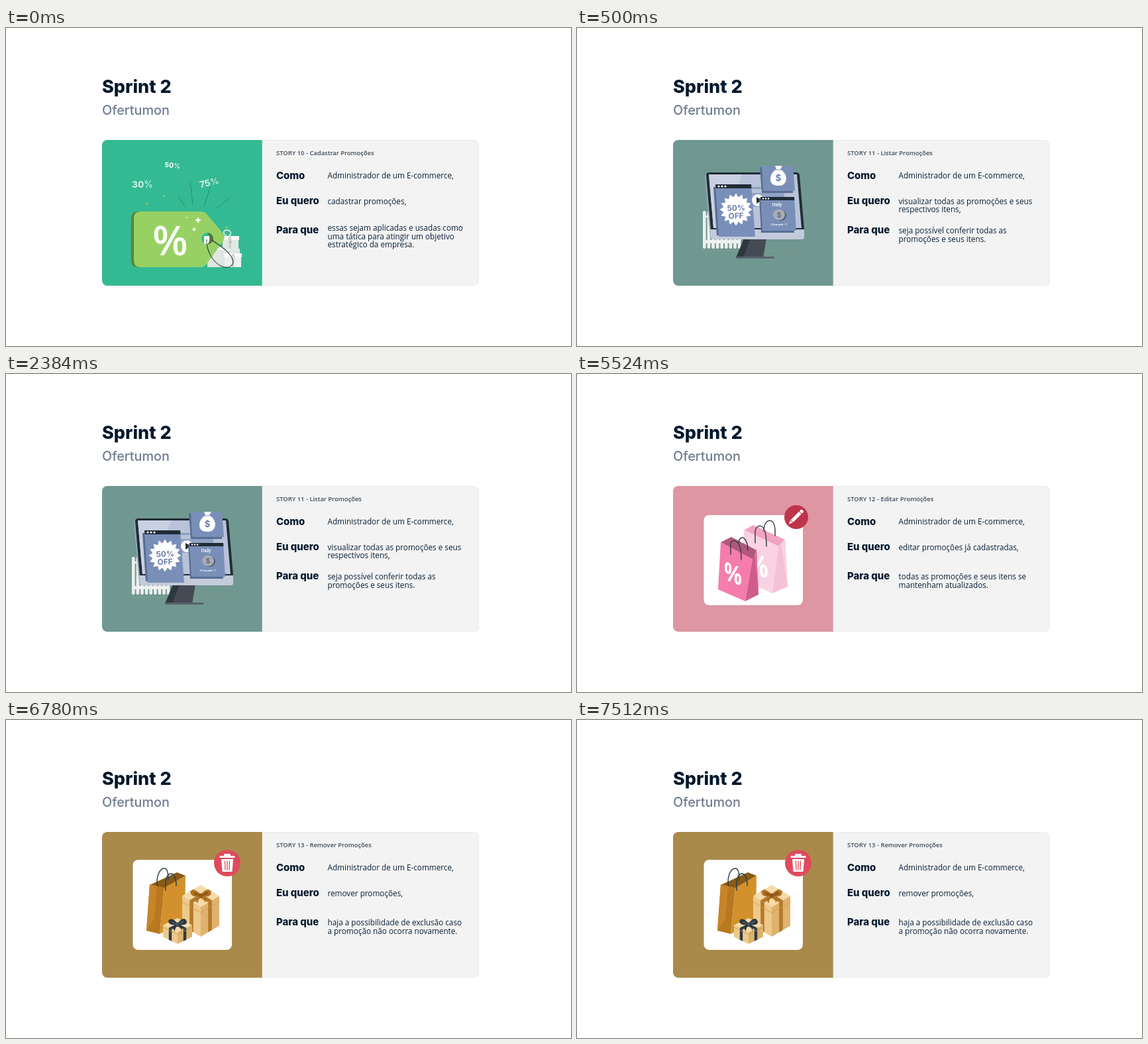
An HTML page for the animation above (8 s loop, 853 px wide and 480 px high).

```html
<!DOCTYPE html>
<html lang="pt">
<head>
<meta charset="utf-8">
<title>Sprint 2</title>
<style>
  html, body { margin: 0; width: 100%; height: 100%; overflow: hidden; background: #fff; }
  svg { display: block; width: 853px; height: 480px; }
  text { font-family: "Open Sans", "Noto Sans", sans-serif; fill: #0b2036; }
  .head { font-family: Inter, sans-serif; font-weight: 700; }
  .heavy { font-weight: 800; fill: #04192d; }
  .brand { font-family: Inter, sans-serif; font-weight: 500; fill: #717b91; }
  .body { font-size: 11.73px; }
  .story { font-size: 9.42px; font-weight: 600; fill: #3f4a57; }
  .ad { font-family: "Noto Serif", serif; font-weight: 700; }
  .white { fill: #fff; }
  .mid { text-anchor: middle; }
  .line { fill: none; stroke-linecap: round; stroke-linejoin: round; }
</style>
</head>
<body>
<svg viewBox="0 0 853 480">
  <defs><clipPath id="card"><rect x="145" y="169" width="569" height="220" rx="8"/></clipPath></defs>
  <text class="head heavy" x="145" y="98.4" font-size="27">Sprint 2</text>
  <text class="brand" x="145" y="131" font-size="19.8">Ofertumon</text>
  <rect x="145" y="169" width="569" height="220" rx="8" fill="#f3f3f3"/>
  <rect x="145.5" y="169.5" width="568" height="219" rx="8" fill="none" stroke="#ebebeb"/>
  <g font-size="14.9">
    <text class="head heavy" x="408" y="228">Como</text>
    <text class="head heavy" x="408" y="265.6">Eu quero</text>
    <text class="head heavy" x="408" y="310.4">Para que</text>
  </g>
  <text class="body" x="485.5" y="227">Administrador de um E-commerce,</text>
  <g id="slides"></g>
</svg>
<script>
const poly = (points, fill, extra = '') => `<polygon points="${points}" fill="${fill}" ${extra}/>`;
const path = (d, fill, extra = '') => `<path d="${d}" fill="${fill}" ${extra}/>`;
const line = (d, stroke, width = 1) => `<path class="line" d="${d}" stroke="${stroke}" stroke-width="${width}"/>`;
const rect = (x, y, w, h, fill, r = 0) => `<rect x="${x}" y="${y}" width="${w}" height="${h}" rx="${r}" fill="${fill}"/>`;
const dot = (x, y, r, fill) => `<circle cx="${x}" cy="${y}" r="${r}" fill="${fill}"/>`;
const range = (n, fn) => Array.from({ length: n }, (_, i) => fn(i)).join('');

const sparkle = (x, y, r) =>
  path(`M${x} ${y - r}Q${x} ${y} ${x + r} ${y}Q${x} ${y} ${x} ${y + r}Q${x} ${y} ${x - r} ${y}Q${x} ${y} ${x} ${y - r}`,
    '#fff', 'stroke="#fff" stroke-width="1"');

const discount = (n, x, y, size, angle, fill) =>
  `<text class="head mid" style="fill:${fill}" font-size="${size}" transform="translate(${x} ${y}) rotate(${angle})">${n}<tspan font-weight="400">%</tspan></text>`;

function burst(x, y, outer, inner, spikes) {
  const points = Array.from({ length: spikes * 2 }, (_, i) => {
    const a = i * Math.PI / spikes, r = i % 2 ? inner : outer;
    return `${(x + r * Math.sin(a)).toFixed(1)},${(y - r * Math.cos(a)).toFixed(1)}`;
  });
  return poly(points.join(' '), '#fff');
}

const skewedPercent = (x, y, size) =>
  `<text class="white mid" font-weight="700" font-size="${size}" transform="matrix(.8 .3 -.04 1 ${x} ${y})">%</text>`;

function priceTag() {
  return rect(304, 333, 49, 28, '#dfe5e1') + rect(302, 330, 37, 5, '#f4f6f4') +
    rect(327, 318, 24, 16, '#e3e8e5') + rect(325, 314, 27, 6, '#f6f7f6') +
    rect(330, 343, 25, 18, '#eef0ee') + rect(329, 340, 27, 6, '#f8f9f8') +
    rect(299, 314, 13, 17, '#f0f3f0') + rect(336, 315, 4, 18, '#c9d6cf') + rect(341, 341, 4, 20, '#d1dad4') +
    line('M333 314C325 309 330 305 333 305C338 305 343 310 336 314', '#eef2ef', 1.5) +
    dot(339, 323, 1.2, '#67b96b') +
    path('M199 277H208V361H199Q189 361 189 350V288Q189 277 199 277Z', '#5c8339') +
    path('M203 277H295Q299 277 302 280L327 309Q332 316 327 323L303 356Q299 361 294 361H203Q193 361 193 351V287Q193 277 203 277ZM304 309A9 9 0 1 0 304 327A9 9 0 1 0 304 309Z', '#97d163', 'fill-rule="evenodd"') +
    path('M304 309A9 9 0 0 1 304 327Q311 318 304 309', '#55753a') +
    line('M303 320C302 332 310 352 324 359C336 365 346 358 342 349C337 336 321 328 311 320', '#263c36', 1.1) +
    line('M303 325Q302 321 306 320', '#eff4ef', 1) +
    '<text class="white mid" x="248" y="343" font-size="62" font-weight="600">%</text>' +
    sparkle(290, 290, 4) + sparkle(284, 304, 2.5) + dot(273, 286, 1, '#fff') +
    line('M260 255L271 270M278 233L282 266M308 240L299 270M338 256L318 272', '#258a6b', .9) +
    [[213, 265], [238, 254], [333, 301]].map(([x, y]) => dot(x, y, 1.3, '#b7cf57')).join('') +
    [[257, 267], [262, 235], [347, 307]].map(([x, y]) => dot(x, y, .8, '#7fc87a')).join('') +
    discount(30, 206, 241, 13.8, 0, '#d9f1e7') +
    discount(50, 251, 211, 10.4, 6, '#fff') +
    discount(75, 308, 238, 13.6, -14, '#d9f1e7');
}

function monitor() {
  const dark = '#202c36', panel = '#7a8fb8', shadow = '#586d92', radiator = '#edf0ee';
  return line('M190 337H343', '#8c9a7d', .8) +
    range(9, i => {
      const top = i < 2 ? 276 : 312;
      return rect(190 + i * 6.6, top, 4.6, 333 - top, radiator, 2);
    }) +
    rect(190, 283, 12, 3, radiator) + rect(190, 320, 57, 5, radiator) +
    poly('252,318 286,318 281,347 240,347', '#454b55') + poly('252,318 262,318 251,347 240,347', '#2f3740') +
    rect(241, 345, 57, 3, '#59626c', 1) +
    path('M197 218L193 223L201 315Q202 319 206 319L210 304Z', '#94a4bd') +
    path('M201 304H343V316Q343 319 339 319H206Q202 319 202 315Z', '#c3cbdb') +
    path('M200 218H331Q335 218 336 222L343 304H202L195 222Q195 218 200 218Z', dark) +
    poly('199,221 332,221 339,302 206,302', '#b8c2d9') + poly('199,221 250,221 214,302 206,302', '#c8d0e1') +
    rect(262, 240, 47, 3, '#8f9fbd') + rect(262, 249, 51, 21, '#91a2c4') +
    poly('206,240 261,240 267,313 211,313', shadow) +
    poly('209,237 263,237 269,315 214,315', panel) + poly('209,236 263,236 263.5,242 209.5,242', dark) +
    range(3, i => dot(214 + i * 5, 239, 1.6, '#fff')) +
    burst(240, 274, 24.5, 19, 16) +
    ['50%', 'OFF'].map((word, i) =>
      `<text class="head mid" style="fill:#687da8" font-size="11.8" transform="translate(240.3 ${275.8 + i * 11.8}) rotate(-2)">${word}</text>`).join('') +
    poly('276,210 324,210 326,249 279,249', shadow) + poly('279,208 326,208 329,246 281,246', panel) +
    path('M299 208L310 208L307 213Q316 219 316 228Q315 238 304 238Q292 238 292 228Q292 219 301 213Z', '#fff') +
    line('M300 214H308', '#8396b8', 1) +
    '<text class="mid head" style="fill:#667da8" x="304" y="230.5" font-size="13">$</text>' +
    dot(273, 260, 9, '#fff') + poly('271,255 279,260 271,265', dark) +
    poly('275,257 326,257 328,309 278,309', shadow) +
    poly('277,255 328,255 331,306 280,306', panel) + poly('277,255 328,255 328.4,260 277.4,260', dark) +
    range(3, i => dot(281 + i * 4, 257.5, 1.2, '#fff')) +
    '<text class="white mid ad" x="302" y="269" font-size="6.3">Only</text>' +
    '<text class="white mid ad" x="305" y="298" font-size="4.1">15/month !!!</text>' +
    '<ellipse cx="307" cy="283" rx="9" ry="8" fill="#535e70"/><ellipse cx="305" cy="282" rx="9" ry="8" fill="#a7adb7"/>' +
    '<text class="mid head" style="fill:#626c7d" x="305" y="286" font-size="10">$</text>';
}

function pinkBags() {
  const handle = '#39414a';
  return rect(191.5, 213, 149.5, 136, '#fff', 8) +
    poly('252,236 266,228 314,250 304,260', '#f2a3c2') +
    poly('252,235 304,260 295,331 248,310', '#f9d3e4') + poly('304,260 314,249 318,321 295,331', '#f5c1d7') +
    poly('308,256 314,249 318,321', '#f9d1e2') +
    skewedPercent(273, 303, 43) +
    line('M269 255V239C269 231 275 227 280 231Q286 236 286 260M282 237C282 225 288 219 294 222Q300 226 299 244', handle, 1.5) +
    poly('217,254 233,246 271,266 265,280', '#b0587b') +
    poly('217,254 265,279 254,343 213,325', '#f57cab') + poly('265,279 271,266 274,333 254,343', '#cf5c8a') +
    poly('268,273 271,266 274,333', '#e06d9a') +
    skewedPercent(235, 315, 38) +
    line('M232 272V258C232 251 238 249 243 255Q248 261 248 280M244 257C244 247 250 244 254 250Q258 256 258 266', handle, 1.5) +
    dot(331, 216, 18, '#be354b') +
    '<g transform="translate(330.5 216) rotate(-45)">' +
    poly('-15,0 -9.5,-2.6 -9.5,2.6', '#fff') + rect(-8.5, -2.6, 17.5, 5.2, '#fff') + rect(10, -2.6, 4.5, 5.2, '#fff', 1.5) +
    '</g>';
}

// Isometric box: top corner, half width, half depth of the lid and side height.
function giftBox(x, y, w, d, h, ribbon) {
  const at = (u, v, drop = 0) => `${x + (u - v) * w},${y + (u + v) * d + drop}`;
  const quad = (corners, fill) => poly(corners.map(c => at(...c)).join(' '), fill);
  const a = .4, b = .6;
  return quad([[0, 1], [1, 1], [1, 1, h], [0, 1, h]], '#edc98b') +
    quad([[1, 1], [1, 0], [1, 0, h], [1, 1, h]], '#dfb36d') +
    quad([[0, 0], [1, 0], [1, 1], [0, 1]], '#f5dba9') +
    quad([[a, 1], [b, 1], [b, 1, h], [a, 1, h]], ribbon) +
    quad([[1, a], [1, b], [1, b, h], [1, a, h]], ribbon) +
    quad([[a, 0], [b, 0], [b, 1], [a, 1]], ribbon) +
    quad([[0, a], [1, a], [1, b], [0, b]], ribbon) +
    line(`M${at(0, 1, h * .2)}L${at(1, 1, h * .2)}L${at(1, 0, h * .2)}`, '#c99b57', .8);
}

const bow = (x, y, s, fill, shade) => `<g transform="translate(${x} ${y}) scale(${s})">` +
  path('M0 0C-7 -12 -17 -9 -15 -3Q-13 3 0 1C13 3 17 -1 15 -5C12 -12 5 -9 0 0Z', fill) +
  path('M-1 0L-11 8L-7 8L-5 12ZM1 0L10 6L7 7L7 11Z', fill) +
  path('M-2 0Q-7 -6 -11 -4Q-10 0 -2 0M2 0Q7 -7 11 -5Q11 0 2 0', shade) + dot(0, 0, 3, shade) + '</g>';

function gifts() {
  return rect(191.5, 211, 149.5, 136, '#fff', 8) +
    poly('217,249 258,230 271,235 239,254', '#8b5a17') +
    line('M229 252C226 239 231 224 239 224Q245 224 245 241', '#29414a', 1.5) +
    poly('217,248 239,253 232,323 212,318', '#b87820') + poly('217,248 228,251 224,300 212,318', '#c78528') +
    poly('239,253 271,235 270,304 232,323', '#d2912d') +
    line('M241 257C240 244 242 231 250 232Q257 234 257 250', '#29414a', 1.5) +
    giftBox(294, 249, 28, 16.5, 45, '#b5792b') + bow(294, 265, 1, '#ae7225', '#8a5718') +
    giftBox(259, 299, 22, 10.5, 18, '#303a42') + bow(259, 308, .9, '#2b363f', '#45525c') +
    dot(334, 216, 20, '#de4b5d') +
    rect(322.5, 205, 23, 3, '#fff', 1) + rect(329, 202, 10, 4, '#fff', 1) +
    path('M325 210H343L341.5 229H326.5Z', '#fff') +
    line('M330.5 213L331 226M334 213V226M337.5 213L337 226', '#de4b5d', 1.3);
}

const LOOP = 8000;
const stories = [
  { start: 0, title: 'STORY 10 - Cadastrar Promoções', color: '#34ba92', art: priceTag,
    want: ['cadastrar promoções,'],
    why: ['essas sejam aplicadas e usadas como', 'uma tática para atingir um objetivo', 'estratégico da empresa.'] },
  { start: 500, title: 'STORY 11 - Listar Promoções', color: '#709890', art: monitor,
    want: ['visualizar todas as promoções e seus', 'respectivos itens,'],
    why: ['seja possível conferir todas as', 'promoções e seus itens.'] },
  { start: 3640, title: 'STORY 12 - Editar Promoções', color: '#dd96a2', art: pinkBags,
    want: ['editar promoções já cadastradas,'],
    why: ['todas as promoções e seus itens se', 'mantenham atualizados.'] },
  { start: 6780, title: 'STORY 13 - Remover Promoções', color: '#aa8a4b', art: gifts,
    want: ['remover promoções,'],
    why: ['haja a possibilidade de exclusão caso', 'a promoção não ocorra novamente.'] },
];

const lines = (rows, y) => rows.map((row, i) =>
  `<text class="body" x="485.5" y="${y + i * 12.8}">${row}</text>`).join('');

const slides = document.getElementById('slides');
slides.innerHTML = stories.map(s => `<g>
  <rect x="145" y="169" width="241.7" height="220" fill="${s.color}" clip-path="url(#card)"/>
  ${s.art()}
  <text class="story" x="408" y="192">${s.title}</text>
  ${lines(s.want, 265.6)}${lines(s.why, s.why.length > 2 ? 305.8 : 310.2)}</g>`).join('');

const begin = performance.now();
function draw(now) {
  const t = Math.max(0, now - begin) % LOOP;
  const current = stories.findLastIndex(s => t >= s.start);
  [...slides.children].forEach((slide, i) => { slide.style.display = i === current ? '' : 'none'; });
  requestAnimationFrame(draw);
}
draw(begin);
</script>
</body>
</html>
```
